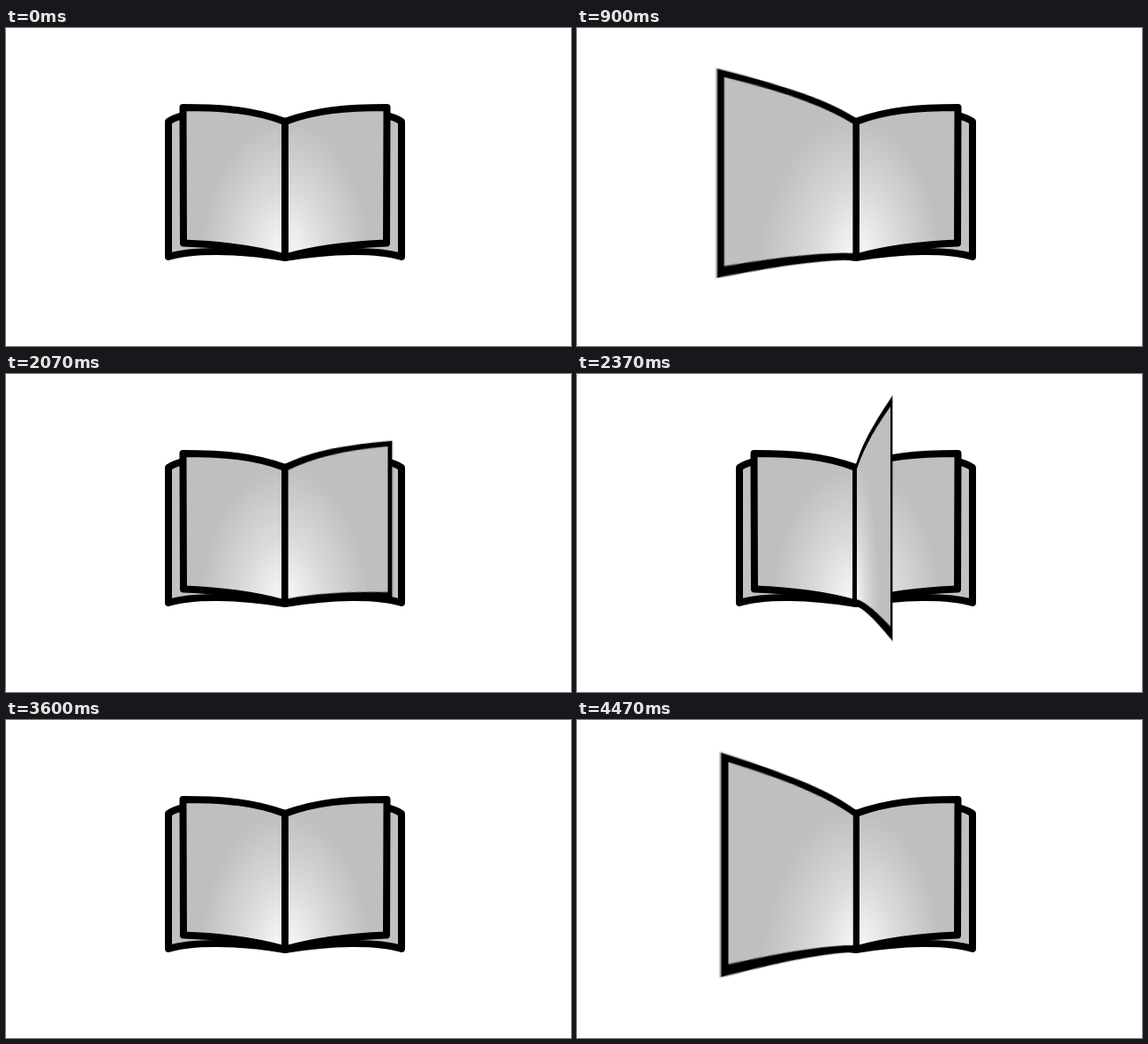
These frames come from a looping animation (640 by 360 pixels, 4500 ms). An HTML page:

```html
<!DOCTYPE html>
<html lang="en">
<head>
<meta charset="utf-8">
<title>Book with turning page</title>
<style>
  html, body { margin: 0; width: 100%; height: 100%; overflow: hidden; background: #fff; }
  #stage {
    position: relative; width: 640px; height: 360px; overflow: hidden;
    perspective: 250px; perspective-origin: 379px 170.5px;
  }
  svg { position: absolute; display: block; }
  #book { left: 0; top: 0; }
  #leaf { left: 316px; top: 70px; overflow: hidden; transform-origin: 0 50%; }
  .ink { stroke: #000; stroke-width: 8; stroke-linejoin: round; stroke-linecap: round; }
</style>
</head>
<body>
<div id="stage">
  <svg id="book" width="640" height="360" viewBox="0 0 640 360">
    <defs>
      <radialGradient id="shade" gradientUnits="userSpaceOnUse" cx="0" cy="0" r="1"
        gradientTransform="translate(316 260) scale(95 155)">
        <stop offset="0" stop-color="#fbfbfb"/>
        <stop offset=".5" stop-color="#dadada"/>
        <stop offset="1" stop-color="#bfbfbf"/>
      </radialGradient>
      <g id="half">
        <path class="ink" fill="#c1c1c1"
          d="M316 106C360 92 430 92 448 106V259C420 250.5 370 251 316 260Z"/>
        <path class="ink" fill="url(#shade)"
          d="M316 106C350 93 386 90 431.5 90L431 243.5C390 245 350 250 316 259.5Z"/>
      </g>
    </defs>
    <use href="#half"/>
    <use href="#half" transform="translate(632 0) scale(-1 1)"/>
  </svg>
  <!-- the turning leaf has a finer outer edge than the resting pages -->
  <svg id="leaf" width="126" height="201" viewBox="316 70 126 201">
    <path d="M316 102C350 89 386 86.7 434.3 86.7V246C390 248 350 253.5 316 263Z"/>
    <path fill="url(#shade)" d="M320 109C350 97.5 386 92 430 92V238.3C390 240.5 350 246 320 254Z"/>
  </svg>
</div>
<script>
  const LOOP = 4500, TURN_EVERY = 1800, TURN = 1370;
  const LAST_TURN = 3600, LAST_DELAY = 13;
  const leaf = document.getElementById('leaf');
  const start = performance.now();

  // cubic-bezier(.42, 0, .58, 1), solved by bisection
  function easeInOut(x) {
    let lo = 0, hi = 1;
    for (let i = 0; i < 24; i++) {
      const u = (lo + hi) / 2, v = 1 - u;
      const bx = 3 * v * v * u * 0.42 + 3 * v * u * u * 0.58 + u * u * u;
      if (bx < x) lo = u; else hi = u;
    }
    return lo * lo * (3 - 2 * lo);
  }

  function draw() {
    const t = (performance.now() - start) % LOOP;
    const phase = t % TURN_EVERY - (t >= LAST_TURN ? LAST_DELAY : 0);
    const p = Math.min(1, Math.max(0, phase / TURN));
    const turning = p > 0.01 && p < 1;
    leaf.style.visibility = turning ? 'visible' : 'hidden';
    leaf.style.transform = `rotateY(${-180 * easeInOut(p)}deg)`;
    requestAnimationFrame(draw);
  }
  draw();
</script>
</body>
</html>
```
